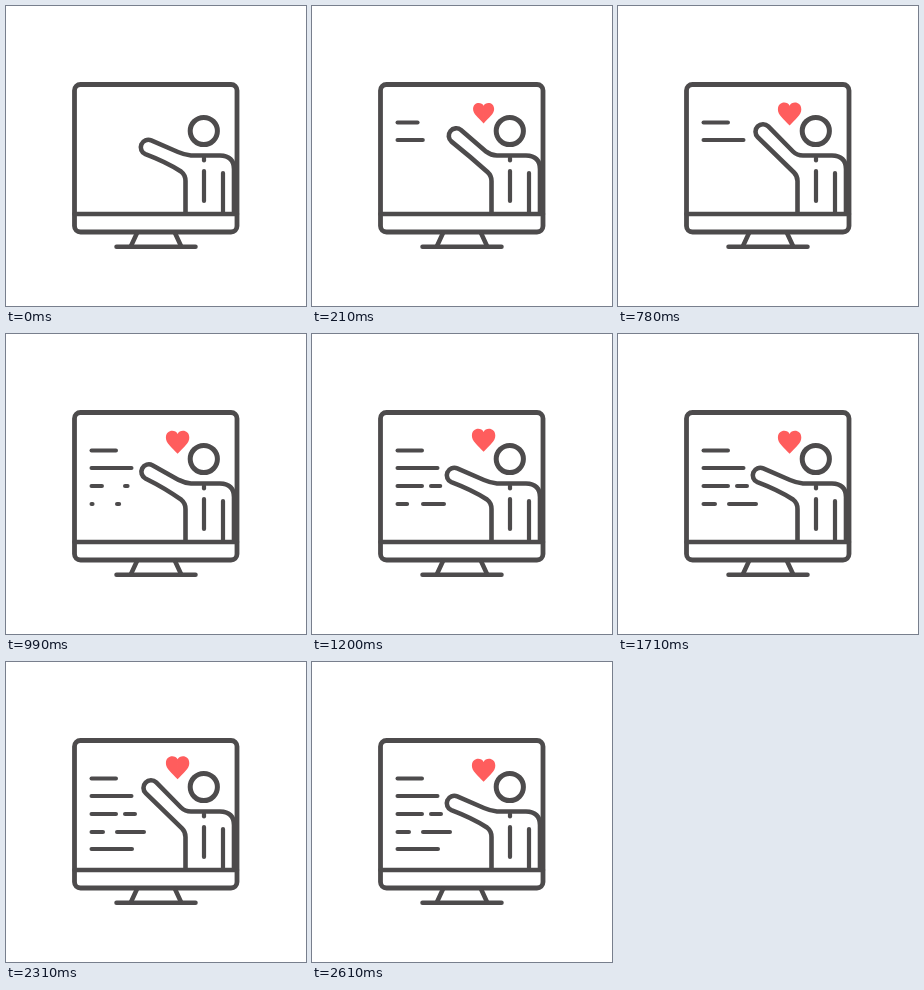
An HTML page with a canvas that plays this animation: 300x300 px, repeating every 2700 ms.

```html
<!DOCTYPE html>
<html lang="en">
<head>
<meta charset="utf-8">
<title>Online lesson</title>
<style>
  html, body { margin: 0; width: 100%; height: 100%; overflow: hidden; background: #fff; }
  canvas { display: block; width: 300px; height: 300px; }
</style>
</head>
<body>
<canvas id="stage" width="300" height="300"></canvas>
<script>
const ctx = document.getElementById('stage').getContext('2d');
const LOOP = 2700, STEP = 30;
const INK = '#4d4b4c', RED = '#ff5d5d';

// Text strokes: x from, x to, y, start ms, end ms
const textLines = [
  [85.5, 110, 116.5, 0, 300],
  [85.5, 125.5, 134, 30, 345],
  [85.5, 110, 152, 810, 1200],
  [119, 129, 152, 820, 1290],
  [85.5, 97, 170, 900, 1320],
  [111, 138, 170, 900, 1350],
  [85.5, 126, 187, 1710, 2160]
];

const lerp = (a, b, k) => a + (b - a) * k;
const ease = k => k < 0.5 ? 2 * k * k : 1 - 2 * (1 - k) * (1 - k);
const progress = (t, from, to) => ease(Math.min(1, Math.max(0, (t - from) / (to - from))));

function stroke(width, trace) {
  ctx.beginPath();
  ctx.lineWidth = width;
  trace();
  ctx.stroke();
}

function line(x1, y1, x2, y2, width = 4) {
  stroke(width, () => { ctx.moveTo(x1, y1); ctx.lineTo(x2, y2); });
}

function drawMonitor() {
  stroke(4.8, () => ctx.roundRect(68.5, 78.5, 162.5, 147.5, 6));
  line(68.5, 208, 231, 208, 4.5);
  line(131, 227, 125, 240, 4.5);
  line(169, 227, 175, 240, 4.5);
  line(110.5, 240.7, 189.5, 240.7, 4.5);
}

function drawPerson(raise) {
  stroke(5, () => ctx.arc(197.8, 125, 13.6, 0, Math.PI * 2));
  line(198, 152, 198, 154.5, 4.2);
  line(198, 165, 198, 195, 4.2);
  line(217, 167, 217, 207, 4.2);

  const handX = lerp(142.3, 145, raise), handY = lerp(141.3, 125.7, raise);
  const angle = lerp(0.4, 0.78, raise), radius = 7.5;
  stroke(4.6, () => {
    ctx.moveTo(179.5, 207);
    ctx.lineTo(179.5, 175);
    ctx.quadraticCurveTo(179.5, lerp(169, 170, raise), lerp(175, 176, raise), lerp(165.5, 166.5, raise));
    ctx.quadraticCurveTo(
      lerp(160, 158, raise), lerp(156, 149, raise),
      handX - radius * Math.sin(angle), handY + radius * Math.cos(angle));
    ctx.arc(handX, handY, radius, angle + Math.PI / 2, angle + Math.PI * 1.5);
    ctx.lineTo(lerp(172, 175, raise), lerp(146, 145.5, raise));
    ctx.quadraticCurveTo(lerp(179, 179, raise), lerp(149, 149.5, raise), 185, 149.5);
    ctx.lineTo(214, 149.5);
    ctx.quadraticCurveTo(228, 150, 228, 163);
    ctx.lineTo(228, 207);
  });
}

function drawHeart(t) {
  const lift = (1 - Math.cos(t / 900 * Math.PI * 2)) / 2;
  const scale = progress(t, 0, 270);
  if (!scale) return;
  ctx.save();
  ctx.translate(171.6, 108.6 - 3 * lift);
  ctx.scale(scale, scale);
  ctx.beginPath();
  ctx.moveTo(0, -8.4);
  for (const side of [1, -1]) {
    const points = [[2, -13, 11.7, -13, 11.7, -4.6], [11.7, 1, 6, 4.5, 0, 11.5]];
    ctx.moveTo(0, -8.4);
    for (const [a, b, c, d, e, f] of points) {
      ctx.bezierCurveTo(a * side, b, c * side, d, e * side, f);
    }
    ctx.lineTo(0, -8.4);
  }
  ctx.fillStyle = RED;
  ctx.fill();
  ctx.restore();
}

function draw(t) {
  ctx.fillStyle = '#fff';
  ctx.fillRect(0, 0, 300, 300);
  ctx.strokeStyle = INK;
  ctx.lineCap = ctx.lineJoin = 'round';

  for (const [x1, x2, y, from, to] of textLines) {
    const k = progress(t, from, to);
    if (k > 0) line(x1, y, lerp(x1, x2, k), y);
  }
  const raise = progress(t, 0, 330) - progress(t, 780, 1095)
    + progress(t, 1860, 2190) - progress(t, 2290, 2610);
  drawPerson(raise);
  drawMonitor();
  drawHeart(t);
}

const start = performance.now();
function tick() {
  const t = (performance.now() - start) % LOOP;
  draw(Math.min(2610, Math.floor(t / STEP) * STEP));
  requestAnimationFrame(tick);
}
tick();
</script>
</body>
</html>
```
